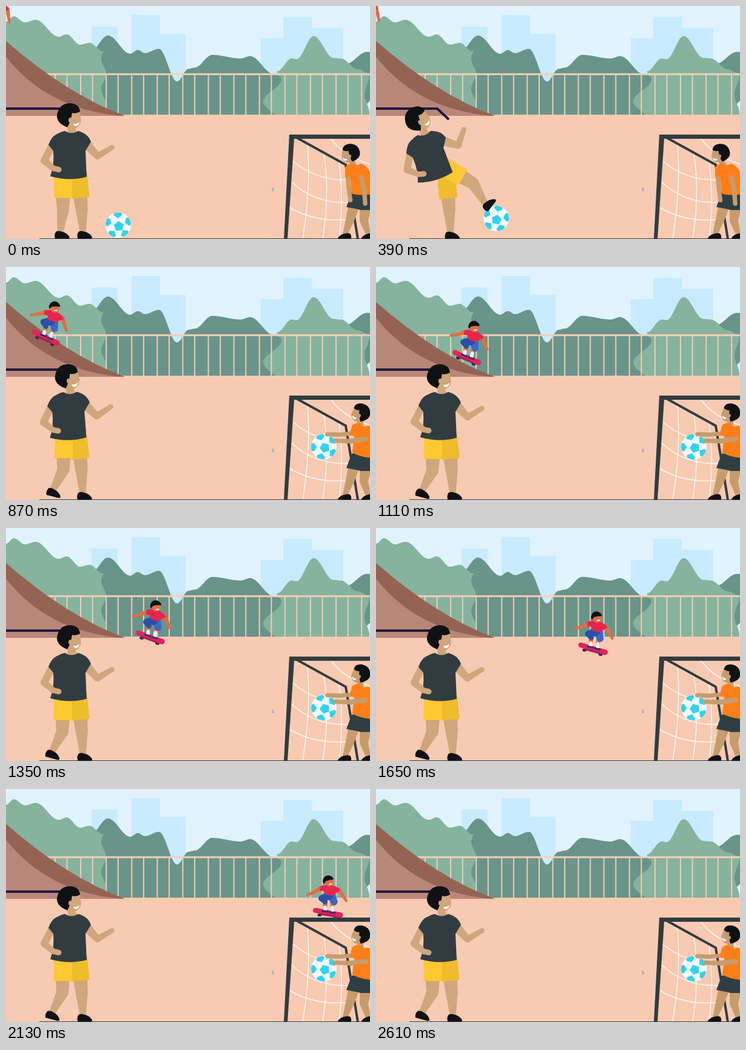
An HTML page with a canvas for the animation above (2.82 s loop, 600 px wide and 386 px high).

```html
<!DOCTYPE html>
<html lang="en">
<head>
<meta charset="utf-8">
<title>Playground</title>
<style>
html, body { margin: 0; width: 100%; height: 100%; overflow: hidden; background: #f9cab2; }
canvas { display: block; width: 600px; height: 386px; }
</style>
</head>
<body>
<canvas id="stage" width="600" height="386"></canvas>
<script>
const ctx = document.getElementById('stage').getContext('2d');
const LOOP = 2820, STEP = 30, LAST = 2610, DEG = Math.PI / 180;
const INK = '#101114', SKIN = '#d0a67c', KEEPER_SKIN = '#c69c6d', SLATE = '#313c40';
const LIGHT = '#86b39e', DARK = '#68948a', PEACH = '#f9cab2';

// ---- helpers ----
const mix = (a, b, k) => Array.isArray(a) ? a.map((v, i) => mix(v, b[i], k)) : a + (b - a) * k;
const smooth = k => k * k * (3 - 2 * k);
const linear = k => k;

function track(t, keys, ease = linear) {
  if (t <= keys[0][0]) return keys[0][1];
  for (let i = 1; i < keys.length; i++) {
    const [t0, a] = keys[i - 1], [t1, b] = keys[i];
    if (t <= t1) return mix(a, b, ease((t - t0) / (t1 - t0)));
  }
  return keys[keys.length - 1][1];
}

function poly(pts, color) {
  ctx.beginPath();
  pts.forEach(p => ctx.lineTo(p[0], p[1]));
  ctx.closePath();
  ctx.fillStyle = color;
  ctx.fill();
}

function shape(d, color) {
  ctx.fillStyle = color;
  ctx.fill(new Path2D(d));
}

function line(d, color, width) {
  ctx.strokeStyle = color;
  ctx.lineWidth = width;
  ctx.stroke(new Path2D(d));
}

function disc(x, y, rx, ry, color) {
  ctx.beginPath();
  ctx.ellipse(x, y, rx, ry, 0, 0, 7);
  ctx.fillStyle = color;
  ctx.fill();
}

function rect(x, y, w, h, color) {
  ctx.fillStyle = color;
  ctx.fillRect(x, y, w, h);
}

function place(x, y, angle, sx, sy, draw) {
  ctx.save();
  ctx.translate(x, y);
  ctx.rotate(angle * DEG);
  ctx.scale(sx, sy);
  draw();
  ctx.restore();
}

// Point at a distance from p; 0 degrees is straight down, 90 is right
const reach = ([x, y], len, angle) => [x + len * Math.sin(angle * DEG), y + len * Math.cos(angle * DEG)];

// Tapered limb through [x, y, radius] joints
function limb(joints, color) {
  joints.forEach(([x, y, r], i) => {
    disc(x, y, r, r, color);
    if (!i) return;
    const [px, py, pr] = joints[i - 1];
    const len = Math.hypot(x - px, y - py) || 1;
    const nx = (py - y) / len, ny = (x - px) / len;
    poly([[px + nx * pr, py + ny * pr], [x + nx * r, y + ny * r],
      [x - nx * r, y - ny * r], [px - nx * pr, py - ny * pr]], color);
  });
}

function arm(shoulder, len, [upper, fore], [r0, r1, r2], color) {
  const elbow = reach(shoulder, len, upper), hand = reach(elbow, len, fore);
  limb([[...shoulder, r0], [...elbow, r1], [...hand, r2]], color);
}

// ---- scenery ----
// Skyline eased between crests and dips, closed by walls that may sway with height
function hedge(color, extrema, leftWall, rightWall) {
  const wave = k => (1 - Math.cos(k * Math.PI)) / 2;
  const [x0, y0] = extrema[0], [x1, y1] = extrema[extrema.length - 1];
  const outline = [];
  for (let y = 190; y > y0; y -= 2) outline.push([leftWall ? leftWall(y) : x0, y]);
  for (let x = x0; x <= x1; x++) outline.push([x, track(x, extrema, wave)]);
  for (let y = y1; y < 190; y += 2) outline.push([rightWall ? rightWall(y) : x1, y]);
  poly(outline, color);
}

function scenery() {
  rect(0, 0, 600, 386, '#e1f3ff');
  for (const [x, y, w] of [[141, 34, 43], [207, 15, 47], [254, 46, 42], [420, 53, 37], [457, 18, 47], [504, 36, 52]])
    rect(x, y, w, 140, '#c9ebff');

  hedge(DARK, [[560, 96], [595, 76], [612, 77]], null, y => 612 - Math.max(0, y - 145));
  hedge(DARK, [[140, 74], [168, 49], [205, 79], [217, 73], [229, 78], [252, 71], [282, 125], [301, 104],
    [311, 102], [340, 81], [387, 87], [402, 83], [442, 113], [460, 118]]);
  hedge(LIGHT, [[447, 108], [471, 87], [479, 88], [507, 50], [540, 86], [552, 87], [580, 105], [599, 112]],
    y => 439 + 15 * Math.cos((y - 122) * 5 * DEG), y => 595 + 4 * Math.cos((y - 115) / 10));
  hedge(LIGHT, [[0, 26], [13, 17], [31, 27], [49, 23], [87, 51], [100, 47], [122, 64], [138, 61], [159, 75]],
    null, y => 161 + 4 * Math.sin((y - 100) * 7.2 * DEG));

  rect(0, 180, 600, 206, PEACH);
  rect(60, 111.5, 540, 3, '#f8cfb6');
  for (let i = -1; i < 24; i++) rect(101 + 21.05 * i - (i % 2 ? 0 : 1.4), 113, 2, 67, '#f3ccb0');

  shape('M0 58Q100 146 196 182H0Z', '#956354');
  shape('M0 84Q68 171 190 182H0Z', '#b98778');
  line('M0 170H101L120 188', '#1f1a3c', 4);
  rect(438, 301, 4, 6, '#b8b7b8');
}

function goal() {
  ctx.globalAlpha = .85;
  line(`M497 230Q503 300 489 386M524 245Q534 310 522 386M549 258Q557 320 549 386
    M473 257Q512 290 565 288M470 291Q512 330 571 325M466 333Q515 362 576 352
    M536 220Q556 248 600 262`, '#fff', 1.5);
  ctx.globalAlpha = 1;
  line('M477 217L560 263L580 386', SLATE, 4);
  shape('M467 213H600V220H475L464 386H458Z', SLATE);
}

// ---- figures ----
function head(x, y, angle, sx, sy, skin) {
  place(x, y, angle, sx, sy, () => {
    shape('M2 -3L18 -7Q22 8 20 13Q14 24 4 22L-3 17Z', skin);
    shape('M-2 20Q-20 13 -19 0Q-16 -20 3 -20Q18 -19 19 -6Q12 -2 6 -4Q4 10 -2 20Z', INK);
    disc(3, 8, 3, 4, skin);
    shape('M8 14Q14 15 18 11Q17 18 12 18Q9 18 8 14Z', '#fff');
  });
}

const shoe = (x, y, angle, sx = 1, sy = 1) => place(x, y, angle, sx, sy, () =>
  shape('M-9 0Q-4 -2 0 0Q7 1 12 7Q15 11 11 12H-10Q-13 6 -9 0Z', INK));

// Hip, thigh angle, shin angle, shoe angle
function leg(hip, thigh, shin, foot, color) {
  const knee = reach(hip, 55, thigh), ankle = reach(knee, 38, shin);
  limb([[...reach(hip, 28, thigh), 12], [...knee, 10], [...ankle, 5]], SKIN);
  shoe(ankle[0] + 2, ankle[1] - 1, foot);
  place(...hip, -thigh, 1, 1, () => rect(-15, -4, 30, 40, color));
}

function player(t) {
  const lean = track(t, [[0, 0], [390, -18], [450, -18], [870, -1.6], [1140, 0]], smooth);
  const tilt = lean / -18;
  const swing = track(t, [[0, [0, -7, 0]], [180, [-8, -48, 35]], [390, [60, 31, -52]],
    [450, [60, 31, -52]], [810, [-1, -27, 15]]], smooth);

  leg(mix([119, 282], [116, 283], tilt), mix(6, 5, tilt), 3, 0, '#efbc2c');
  leg(mix([94, 282], [112, 266], tilt), ...swing, '#fec832');

  place(105, 300, lean, 1, 1, () => {
    ctx.translate(-105, -300);
    arm([132, 228], 28, mix([42, 121], [56, 142], tilt), [8, 5.5, 4], SKIN);
    limb([[107, 196, 6], [109, 209, 7]], SKIN);
    shape(`M97 207Q108 214 119 207Q135 211 140 225L131 240L133 283Q104 291 73 282
      Q80 262 78 241L70 230Q78 211 97 207Z`, SLATE);
    limb([[74, 235, 6], [63, 256, 6], [78, 269, 4.5], [87, 271, 4.5]], SKIN);
    shape('M84 212L92 226L79 241L70 230Q75 216 84 212Z', SLATE);
    head(103, 181, -10 * tilt, 1, 1, SKIN);
  });
}

function keeper(t) {
  const k = smooth(track(t, [[570, 0], [750, 1]]));
  limb([[592, 338, 9], [590, 355, 7], [597, 378, 4]], KEEPER_SKIN);
  limb([[573, 333, 9], [567, 354, 7], [559, 378, 4]], KEEPER_SKIN);
  shoe(559, 377, 0, -.9, .8);
  shoe(598, 377, 0, -.9, .8);
  shape('M570 309H601L606 338H585L577 336L561 333Z', '#2f3e42');

  place(585, 312, 14 * k, 1, 1, () => {
    ctx.translate(-585, -312);
    limb([[570, 256, 5], [573, 266, 5]], KEEPER_SKIN);
    shape('M559 267Q565 260 570 261Q577 267 585 261Q597 265 602 280V312Q585 315 570 311L567 284H559Z', '#fe7f17');
    arm([586, 284], 22 + 3 * k, mix([12, 4], [-68, -78], k), [4, 4, 3.5], KEEPER_SKIN);
    arm([563, 280], 21, mix([5, 8], [-70, -78], k), [3.5, 3.5, 3.5], KEEPER_SKIN);
    shape('M559 267L572 268L569 282L559 284Z', '#fe7f17');
    head(569, 243, 0, -.76, .74, KEEPER_SKIN);
  });
}

function ball(t) {
  const run = Math.min(339, Math.max(0, .88 * (t - 375)));
  const x = 185 + run, y = 363 - .85 * run + .00194 * run * run;
  place(x, y, run / 339 * 342, 1, 1, () => {
    const pentagon = (cx, cy, r, turn) => poly([0, 1, 2, 3, 4].map(i => {
      const a = (turn + 72 * i) * DEG;
      return [cx + r * Math.cos(a), cy + r * Math.sin(a)];
    }), '#2fd3f1');
    disc(0, 0, 21, 21, '#f2fbff');
    ctx.beginPath();
    ctx.arc(0, 0, 21, 0, 7);
    ctx.clip();
    for (let i = 0; i < 5; i++) {
      const a = -92 + 72 * i, c = 19 * Math.cos(a * DEG), s = 19 * Math.sin(a * DEG);
      line(`M0 0L${c} ${s}`, '#d3eef7', 1);
      pentagon(c, s, 7.5, a + 180);
    }
    pentagon(1, 2, 8.5, -92);
  });
}

function skater(t) {
  const [x, y] = track(t, [[540, [-30, 32]], [870, [66, 117]], [1110, [150, 150]],
    [1350, [238, 181]], [1650, [358, 200]], [2130, [531, 205]], [2430, [640, 203]]]);
  const skin = '#dd6f45', shirt = '#e8254e';
  place(x, y, 15 - (t - 870) / 84, 1, 1, () => {
    for (const wheel of [-14, 13]) disc(wheel, 6 + wheel / 6, 3.5, 2.5, '#2a2a5c');
    limb([[-21, -4, 4], [20, 4, 4.5]], '#e4225c');
    limb([[-13, 2, 1.5], [10, 6, 1.5]], '#a91d50');
    for (const foot of [-5, 7]) {
      limb([[foot, -18, 4], [foot, -9, 3]], skin);
      limb([[foot, -9, 2.8], [foot, -4, 3]], '#f4f1f5');
      limb([[foot - 4, -2 + foot / 6, 1.6], [foot + 4, -1 + foot / 6, 1.6]], '#34346b');
    }
    arm([-12, -40], 12, [-62, -68], [4, 2.8, 2.2], skin);
    arm([17, -38], 11, [38, 32], [4, 2.8, 2.2], skin);
    limb([[6, -27, 7], [10, -18, 5.5]], '#3a68c9');
    limb([[1, -28, 7], [-11, -24, 5], [-5, -18, 4]], '#2c4fa8');
    shape('M-14 -43Q-6 -48 8 -45Q17 -43 20 -37L14 -33L9 -28L-5 -30L-7 -36L-13 -36Z', shirt);
    disc(2, -50, 7.5, 6.5, skin);
    shape('M-9 -52Q-8 -62 1 -62Q9 -60 9 -55Q2 -55 -4 -52L-7 -47Z', INK);
    limb([[2, -47, .8], [6, -48, .8]], '#fff');
  });
}

function draw(now) {
  const t = Math.min(LAST, Math.floor((now % LOOP) / STEP) * STEP);
  scenery();
  skater(t);
  goal();
  ball(t);
  keeper(t);
  player(t);
  rect(55, 385, 545, 1, '#3a3a3a');
  requestAnimationFrame(draw);
}
draw(performance.now());
</script>
</body>
</html>
```
